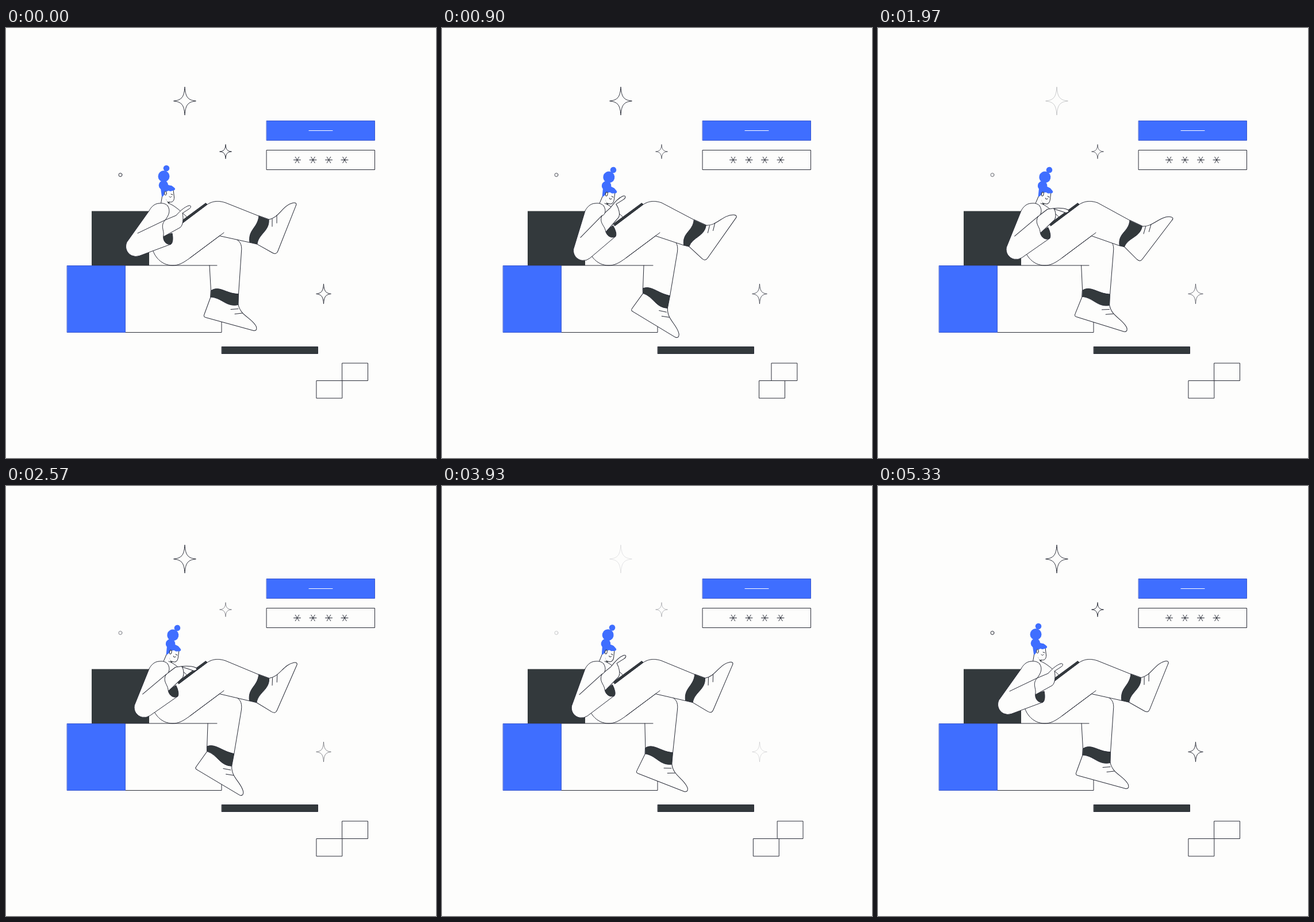
Recreate the animation shown at these times as an HTML page with a canvas. Size 748 by 748 pixels, loop 5360 ms.

```html
<!DOCTYPE html>
<html lang="en">
<head>
<meta charset="utf-8">
<title>Relaxing with a tablet</title>
<style>
html, body { margin: 0; width: 100%; height: 100%; overflow: hidden; background: #fdfdfc; }
canvas { display: block; width: 748px; height: 748px; }
</style>
</head>
<body>
<canvas id="stage" width="748" height="748"></canvas>
<script>
const ctx = document.getElementById('stage').getContext('2d');
const LOOP = 5360, PAPER = '#fdfdfc', BLUE = '#3f6eff', DARK = '#33393c', INK = '#2a2d38';
const RAD = Math.PI / 180, TAU = Math.PI * 2;

const clamp = v => Math.max(0, Math.min(1, v));
const smooth = v => { v = clamp(v); return v * v * (3 - 2 * v); };
const mix = (a, b, u) => a + (b - a) * u;
const swing = (t, period) => (1 - Math.cos(TAU * t / period)) / 2;

// keys: [time, value] pairs with eased steps between them
function track(keys, t) {
  for (let i = 1; i < keys.length; i++) {
    const [t0, a] = keys[i - 1], [t1, b] = keys[i];
    if (t <= t1) return mix(a, b, smooth((t - t0) / (t1 - t0)));
  }
  return keys[keys.length - 1][1];
}

const headKeys = [[0, 0], [470, 19.8], [850, 13.6], [3830, 13.6], [4390, -3.2], [4850, 0]];
const armKeys = [[0, 0], [470, 24], [850, 20], [1330, 20], [1700, 14.5], [2640, 14.5],
  [3180, 22.5], [3480, 20], [3780, 20], [4360, 0]];
// 0: fingers straight, 1: fingers flat on the tablet
const handKeys = [[470, 0], [850, 0.28], [1330, 0.28], [1700, 1], [2640, 1], [3100, 0.28],
  [3780, 0.28], [4360, 0]];

function paint(fill, stroke = INK) {
  if (fill) { ctx.fillStyle = fill; ctx.fill(); }
  if (stroke) { ctx.strokeStyle = stroke; ctx.stroke(); }
}
function shape(d, fill, stroke = INK) {
  const p = new Path2D(d);
  if (fill) { ctx.fillStyle = fill; ctx.fill(p); }
  if (stroke) { ctx.strokeStyle = stroke; ctx.stroke(p); }
}
function box(x, y, w, h, fill, stroke) {
  ctx.beginPath();
  ctx.rect(x, y, w, h);
  paint(fill, stroke);
}
function dot(x, y, r, fill, stroke) {
  ctx.beginPath();
  ctx.arc(x, y, r, 0, TAU);
  paint(fill, stroke);
}
function spin(x, y, deg) {
  ctx.translate(x, y);
  ctx.rotate(deg * RAD);
  ctx.translate(-x, -y);
}
function group(draw) {
  ctx.save();
  draw();
  ctx.restore();
}

function star(x, y, w, h) {
  const far = 0.28, near = 0.07;
  ctx.beginPath();
  for (const [sx, sy] of [[1, 1], [1, -1], [-1, -1], [-1, 1]]) {
    const a = w * sx, b = h * sy;
    ctx.moveTo(x, y + b);
    ctx.bezierCurveTo(x + a * near, y + b * far, x + a * far, y + b * near, x + a, y);
  }
  paint(null);
}

function sparkles(t) {
  const p = t % (LOOP / 3);
  const fade = (low, mid, end, draw) => group(() => {
    ctx.globalAlpha = track([[0, 1], [mid, low], [end, 1]], p);
    draw();
  });
  fade(0, 270, 670, () => star(311, 127, 19, 24));
  fade(0.2, 460, 1200, () => star(382, 215, 10, 12));
  fade(0, 470, 1070, () => star(552.5, 462.5, 12.5, 17));
  fade(0.12, 470, 1070, () => dot(199, 255.5, 3, null, INK));
}

function asterisk(x, y, s) {
  ctx.beginPath();
  for (const [dx, dy] of [[6, 0], [3.2, 5.2], [3.2, -5.2]]) {
    ctx.moveTo(x - dx * s, y - dy * s);
    ctx.lineTo(x + dx * s, y + dy * s);
  }
  paint(null);
}

function panel(t) {
  box(453.5, 161.5, 188, 34, BLUE, '#3a58cf');
  shape('M527 178.5H568', null, '#fff');
  box(453.5, 212.5, 188, 34, null, INK);
  for (let i = 0; i < 4; i++) {
    const d = clamp(Math.abs(t - 2980 - i * 120) / 200);
    asterisk(506.5 + i * 27.5, 229.5, 1 + 0.15 * (1 + Math.cos(Math.PI * d)));
  }
}

function tiles(t) {
  const p = t % (LOOP / 2) - 50;
  const dx = p > 0 && p < LOOP / 4 ? 14 * swing(p, LOOP / 4) : 0;
  box(585 - dx, 583, 44.5, 30.5, null, INK);
  box(540.3 + dx, 613.5, 44.5, 30.5, null, INK);
}

function bench() {
  box(149, 318.5, 100, 94.5, DARK, null);
  box(207.5, 413.5, 167.5, 116, PAPER, null);
  shape('M207 529.5H375V413', null);
  box(106.5, 413.5, 101, 116, BLUE, '#3a58cf');
  box(375.5, 554.5, 167, 12, DARK, INK);
}

function lowerLeg(u) {
  const turn = () => spin(376.7, 442.4, 15.8 * u);
  const shin = [mix(356.5, 349.5, u), mix(457, 453, u)];
  const back = [mix(404.5, 396.5, u), mix(463, 466, u)];
  ctx.beginPath();
  ctx.moveTo(371, 361);
  ctx.lineTo(394, 364.5);
  ctx.bezierCurveTo(407, 369, 411, 376, 409.5, 389);
  ctx.lineTo(...back);
  ctx.lineTo(...shin);
  ctx.lineTo(mix(354, 351, u), 413);
  paint(PAPER);
  group(() => {
    turn();
    shape('M356 468L345 498C343 502 345 503 349 504L431 526.5C437 527 437 521 434 517' +
      'C425 503 408 500 404 481', PAPER);
    shape('M391 489.5L404 488.5M398 497.5L411 496', null);
  });
  ctx.beginPath();
  ctx.moveTo(...shin);
  ctx.bezierCurveTo(shin[0] + 14, shin[1] - 10 + 4 * u, back[0] - 22, back[1] - 1 - 4 * u, ...back);
  group(() => {
    turn();
    ctx.lineTo(404, 481.5);
    ctx.bezierCurveTo(383, 486, 376, 469, 356, 468);
  });
  ctx.closePath();
  paint(DARK);
}

function thigh(u) {
  const knee = [mix(440, 438, u), mix(327, 335, u)];
  const calf = [mix(424, 420, u), mix(373, 379, u)];
  const turn = () => spin(416, 348, 16.6 * u);
  ctx.beginPath();
  ctx.moveTo(371, 361.5);
  ctx.lineTo(...calf);
  ctx.lineTo(...knee);
  ctx.lineTo(382, 304);
  ctx.bezierCurveTo(370, 300, 358, 300, 346, 310);
  ctx.lineTo(300, 344);
  ctx.lineTo(290, 400);
  paint(PAPER, null);

  ctx.beginPath();
  ctx.moveTo(371, 361.5);
  ctx.lineTo(...calf);
  ctx.moveTo(...knee);
  ctx.lineTo(382, 304);
  ctx.bezierCurveTo(370, 300, 358, 300, 346, 310);
  ctx.lineTo(300, 344);
  paint(null);

  group(() => {
    turn();
    shape('M457 333C475 330 481 308 499 304C504 303 506 305 504 309L473 388' +
      'C471 393 468 393 464 391L437 376', PAPER);
    shape('M463 332V345M471 325.5V339', null);
  });
  ctx.beginPath();
  ctx.moveTo(...knee);
  ctx.bezierCurveTo(knee[0] - 2, knee[1] + 21, calf[0] - 3, calf[1] - 23, ...calf);
  group(() => {
    turn();
    ctx.lineTo(437, 376);
    ctx.bezierCurveTo(439, 358, 459, 353, 457, 333);
  });
  ctx.closePath();
  paint(DARK);
}

function torso() {
  shape('M250 318L262 305L283 305C294 309 304 319 315 329L300 344L345 310L379 356L320 400' +
    'C308 409 300 413 290 413C270 413 258 397 255 385Z', PAPER, null);
  shape('M283 305C294 309 304 319 315 329M379 356L320 400C308 409 300 413 290 413' +
    'C270 413 258 397 255 385', null);
}

function head(deg) {
  group(() => {
    spin(276, 325, deg);
    shape('M272 288L269 308L283 310L283 302C290 304 293 300 292.5 294L291 279L275 276Z', PAPER, null);
    shape('M272.5 288L269 308M291 281L292.5 294C293 301 289 304 283.5 302.5L282.5 308', null);
    shape('M278 297C279 301 282 303 285 303L282.5 306Z', DARK, null);
    shape('M284 293C285 295 287 295 288 293M287 289L290 290', null);
    shape('M271 293L269 279C274 270 288 272 294 279C295 283 289 284 283 283' +
      'C278 284 276 289 273 293Z', BLUE, null);
    dot(279, 244, 5.3, BLUE, null);
    dot(274.5, 258, 10, BLUE, null);
    dot(274, 273.5, 8.3, BLUE, null);
    dot(286, 279, 5, BLUE, null);
    ctx.beginPath();
    ctx.ellipse(277.5, 287.5, 1.8, 3.4, 0, 0, TAU);
    paint(PAPER);
  });
}

function arm(deg, bend) {
  const ex = 226 + deg, ey = 380 + deg * 0.35;
  const fore = () => {
    ctx.translate(ex, ey);
    ctx.rotate(-deg * RAD);
    ctx.translate(-226, -380);
  };
  const hand = () => {
    spin(296, 326, 48 * bend);
    ctx.translate(296, 326);
    ctx.scale(1 + 0.3 * bend, 1 + 0.1 * bend);
    ctx.translate(-296, -326);
  };

  // inside of the wide sleeve, then wrist and fingers
  group(() => {
    fore();
    shape('M273 362L289 357C291 366 290 374 287 376C279 379 272 371 273 362Z', DARK);
    ctx.beginPath();
    ctx.moveTo(277, 334);
    ctx.lineTo(296, 326);
    group(() => {
      hand();
      ctx.bezierCurveTo(303, 318, 311, 311, 318, 309);
      ctx.bezierCurveTo(323, 308, 322, 313, 318, 315);
    });
    ctx.lineTo(307, 322 + 6 * bend);
    ctx.bezierCurveTo(309, 332, 308, 343, 303, 347);
    ctx.lineTo(274, 363);
    paint(PAPER);
  });

  const start = Math.atan2(318 - ey, 255 - ex) - Math.PI / 2 + TAU;
  ctx.beginPath();
  ctx.moveTo(281, 309);
  ctx.bezierCurveTo(277, 305, 272, 304.5, 267, 305);
  ctx.bezierCurveTo(258, 305, 252, 312, 249, 318);
  ctx.arc(ex, ey, 17.5, start, (70 - deg) * RAD, true);
  group(() => {
    fore();
    ctx.lineTo(287, 376);
    ctx.bezierCurveTo(279, 378, 272, 370, 274, 360);
    ctx.bezierCurveTo(275, 351, 268, 344, 277, 334);
  });
  ctx.bezierCurveTo(283, 326, 287, 318, 281, 309);
  paint(PAPER);
  group(() => {
    fore();
    shape('M229 357L277 334', null);
  });
}

function draw(t) {
  ctx.fillStyle = PAPER;
  ctx.fillRect(0, 0, 748, 748);
  ctx.lineWidth = 1;
  ctx.lineJoin = ctx.lineCap = 'round';
  sparkles(t);
  panel(t);
  tiles(t);
  bench();
  lowerLeg(swing(t + 20, LOOP / 3));
  head(track(headKeys, t));
  torso();
  thigh(swing(t - 50, LOOP / 4));
  shape('M379 356L320 400', null);
  shape('M298 341L347.5 304.5L350 307L301 344Z', DARK);
  shape('M207 413H367', null);
  arm(track(armKeys, t), track(handKeys, t));
}

let origin = null;
function tick(now) {
  if (origin === null) origin = now;
  draw((now - origin) % LOOP);
  requestAnimationFrame(tick);
}
draw(0);
requestAnimationFrame(tick);
</script>
</body>
</html>
```
